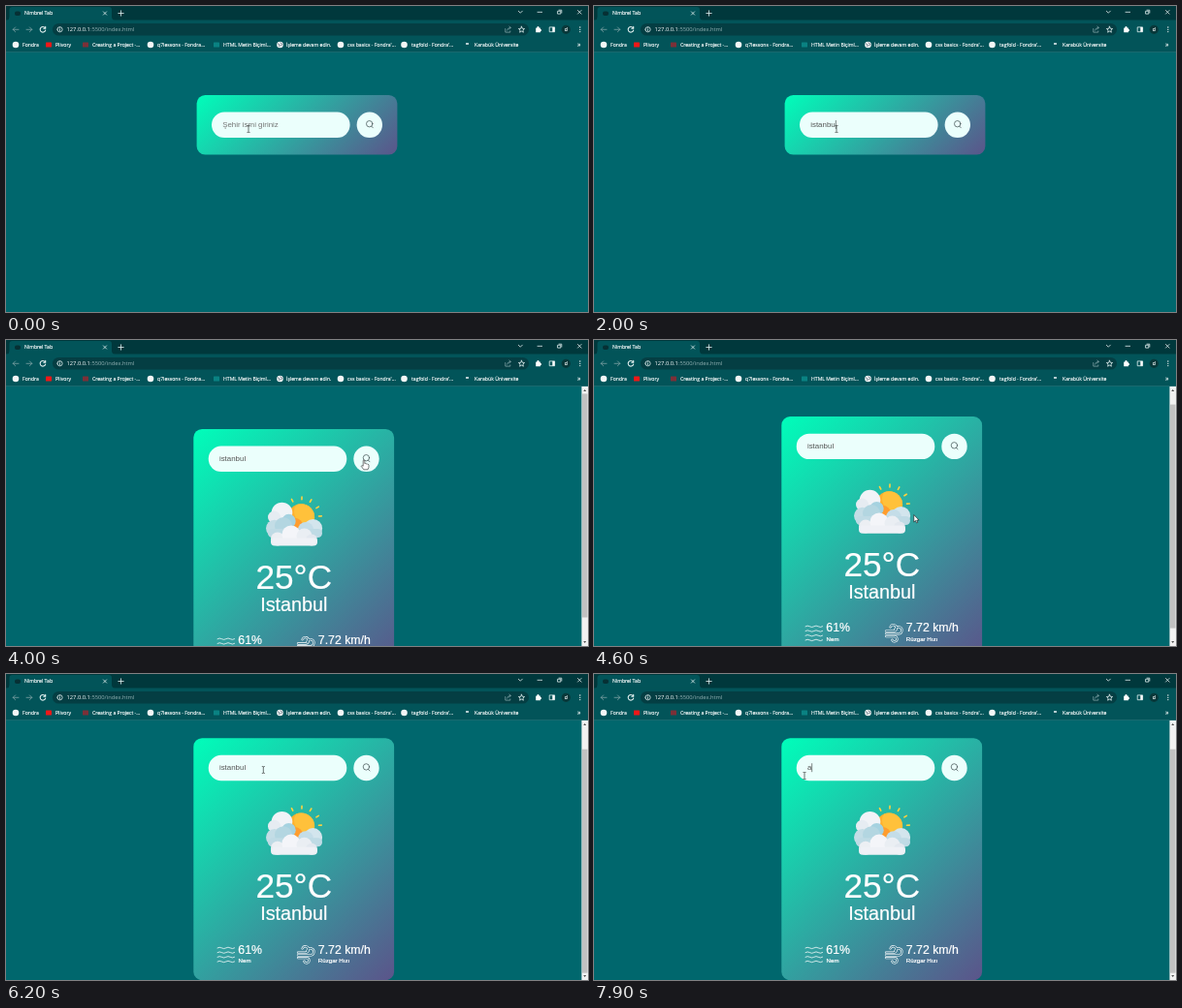
An HTML page that plays this animation: 600 by 316 pixels, repeating every 8000 ms.

```html
<!DOCTYPE html>
<html lang="tr">
<head>
<meta charset="utf-8">
<title>Nimbrel Tab</title>
<style>
  html, body { margin: 0; width: 100%; height: 100%; overflow: hidden; background: #00676d; }
  svg { display: block; width: 100vw; height: 100vh; }
  .ui { font-family: "Open Sans", "Noto Sans", sans-serif; font-size: 5.15px; fill: #fff; }
  .ui text { stroke: #fff; stroke-width: .14; }
  .ui .url { font-size: 5.78px; stroke: none; }
  .page { font-family: "Liberation Sans", Arial, sans-serif; fill: #fff; }
  #result text { stroke: #fff; stroke-width: .22; }
  .line { fill: none; stroke: #e4f0f0; stroke-width: .8; stroke-linecap: round; stroke-linejoin: round; }
</style>
</head>
<body>
<svg viewBox="0 0 600 316" xmlns="http://www.w3.org/2000/svg">
  <defs>
    <linearGradient id="cardFill" gradientUnits="userSpaceOnUse">
      <stop offset="0" stop-color="#00feba"/>
      <stop offset="1" stop-color="#5b548a"/>
    </linearGradient>
    <clipPath id="sunClip"><circle cx="304.3" cy="183" r="13.8"/></clipPath>
  </defs>

  <rect width="600" height="316" fill="#00676d"/>

  <g id="content" class="page">
    <g id="panel">
      <rect id="card" x="196.6" y="92" width="206.8" rx="8.8" fill="url(#cardFill)"/>
      <rect x="212" y="109.6" width="142.6" height="26.4" rx="13.2" fill="#ebfffc"/>
      <rect id="selection" y="117.8" height="9.4" fill="#3390ff"/>
      <text id="query" x="223.2" y="125.1" font-size="7.92"></text>
      <rect id="caret" y="118" width=".6" height="9" fill="#333"/>
      <circle cx="374.8" cy="122.8" r="13.2" fill="#ebfffc"/>
      <g class="line" style="stroke:#3c4a4c;stroke-width:.7">
        <circle cx="374.7" cy="121.7" r="3.2"/>
        <path d="M376.8 124.2l1.5 1.6"/>
      </g>
    </g>
    <g id="result">
      <g id="icon"></g>
      <text x="296.8" y="257.3" font-size="35.2" text-anchor="middle">25°C</text>
      <text x="296.8" y="279.5" font-size="19.8" text-anchor="middle">Istanbul</text>
      <g id="waves" class="line" style="stroke:#fff;stroke-width:.75"></g>
      <text x="239.3" y="314.4" font-size="12.3">61%</text>
      <text x="239.6" y="323.6" font-size="6.16">Nem</text>
      <g id="wind" fill="none" stroke-linecap="round"></g>
      <text x="321.8" y="314.4" font-size="12.3">7.72 km/h</text>
      <text x="321.8" y="323.6" font-size="6.16">Rüzgar Hızı</text>
    </g>
  </g>

  <g id="scrollbar">
    <rect x="593.4" y="48" width="6.6" height="268" fill="#f1f1f1"/>
    <path d="M595.2 53l1.5-2 1.5 2zM595.2 311l1.5 2 1.5-2z" fill="#505050"/>
    <rect id="thumb" x="594" width="5.5" height="231" fill="#c1c1c1"/>
  </g>

  <g id="chrome" class="ui"></g>

  <path id="ibeam" d="M-1.5-3.5H-.5L0-3.1.5-3.5H1.5M0-3.1V3.1M-1.5 3.5H-.5L0 3.1.5 3.5H1.5"
        fill="none" stroke="#222" stroke-width=".65"/>
  <path id="arrow" d="M0 0V7.5L1.7 5.9 2.8 8.4 4 7.9 2.9 5.5H5.3Z" fill="#fff" stroke="#111" stroke-width=".6"/>
  <path id="hand" d="M-.8 .4Q0-.5 .8 .4V3.6Q1.8 3 2.4 3.9 3.4 3.4 3.9 4.4 4.9 4.2 5 5.2V7.4L4 9.8H-.2L-2.8 6.3Q-2.6 5 -.8 6.2Z"
        fill="#fff" stroke="#222" stroke-width=".6" stroke-linejoin="round"/>
</svg>

<script>
const $ = id => document.getElementById(id);
const set = (id, attrs) => Object.entries(attrs).forEach(([k, v]) => $(id).setAttribute(k, v));
const show = (id, on) => { $(id).style.display = on ? "" : "none"; };
const circle = (x, y, r, fill) => `<circle cx="${x}" cy="${y}" r="${r}" fill="${fill}"/>`;
const box = (x, y, w, h, fill, rx = 0) =>
  `<rect x="${x}" y="${y}" width="${w}" height="${h}" rx="${rx}" fill="${fill}"/>`;
const label = (x, y, text, extra = "") => `<text x="${x}" y="${y}" ${extra}>${text}</text>`;
const line = (d, extra = "") => `<path class="line" d="${d}" ${extra}/>`;

function drawChrome() {
  const bar = "#025459", dim = 'style="stroke:#7fa3a6"';
  const dot = (x, fill) => circle(x, 40, 3.3, fill);
  const tile = (x, fill) => box(x - 3, 37.5, 6, 5, fill, .6);
  const marks = [
    [17, "Fondra", dot(10, "#f4f6f6")],
    [51, "Plivory", tile(44, "#f01818")],
    [89, "Creating a Project -...", tile(82, "#7b3038")],
    [156, "q7lessons - Fondra...", dot(149, "#f4f6f6")],
    [224, "HTML Metin Biçiml...", tile(217, "#0a8282")],
    [289, "İşleme devam edin.", dot(282.5, "#f4f6f6") +
      line("M280.5 39l1.6 1.2-.4 1.4M283 37.8l1.6 1.6-1 1.6", 'style="stroke:#456"')],
    [352, "css basics - Fondra'...", dot(345, "#f4f6f6")],
    [418, "tagfold - Fondra'...", dot(410.5, "#f4f6f6")],
    [483, "Karabük Üniversite", box(474, 38, 3, 2, "#b5cdd0")]
  ];
  $("chrome").innerHTML =
    box(0, 0, 600, 15, "#00383c") +
    `<path d="M1 15Q3.5 14 3.5 11V4Q3.5 1 6.5 1H106Q109 1 109 4V11Q109 14 112 15Z" fill="${bar}"/>` +
    box(0, 14.5, 600, 33.5, bar) + box(0, 47.4, 600, .6, "#2b787d") +
    box(9, 5.5, 6, 4.5, "#063034", 2) + label(19, 9.3, "Nimbrel Tab") +
    line("M100.4 5.9l3.2 3.2m0-3.2l-3.2 3.2M118.5 4.8v5.4M115.8 7.5h5.4") +
    line("M528.3 5.2l2 2 2-2M548 6.3h4.6M569 5.3h2.8v2.8h-2.8zM570 4.2h2.8v2.8M589.5 4.5l3.6 3.6m0-3.6l-3.6 3.6") +
    line("M13 24.3H7.2m2.4-2.4l-2.4 2.4 2.4 2.4M21 24.3h5.8m-2.4-2.4l2.4 2.4-2.4 2.4", dim) +
    line("M40.3 22.7A2.8 2.8 0 1 0 40.7 25M40.7 21.4v1.9h-2", 'style="stroke-width:1.1"') +
    box(48, 18, 491, 12.6, "#043e43", 6.3) +
    line("M52.9 24.2a2.6 2.6 0 1 0 5.2 0a2.6 2.6 0 1 0-5.2 0M55.5 24v1.5M55.5 22.7v.1") +
    label(62.5, 26.3, '127.0.0.1<tspan fill="#93b1b3">:5500/index.html</tspan>', 'class="url"') +
    line("M514.8 23.5v3.6h5v-1.2M516.6 25q.4-2.6 3.6-2.6m-1.3-1.3l1.5 1.3-1.5 1.3", dim) +
    line("M531.5 21.2l.9 2.1 2.2.2-1.7 1.5.5 2.2-1.9-1.1-1.9 1.1.5-2.2-1.7-1.5 2.2-.2z") +
    box(546.2, 22.6, 4.8, 4.6, "#fff", .5) + circle(548.5, 22.2, 1.1, "#fff") + circle(551, 25, 1.1, "#fff") +
    line("M560.6 21.9h5v4.8h-5z") + box(563.3, 21.9, 2.3, 4.8, "#fff") +
    circle(577.3, 24.3, 4.6, "#08383a") + label(577.3, 26, "d", 'text-anchor="middle"') +
    [22, 24.3, 26.6].map(y => circle(591.8, y, .65, "#fff")).join("") +
    marks.map(([x, text, icon]) => icon + label(x, 41.8, text)).join("") +
    label(589, 42, "»", 'style="font-size:7px"');
}

function drawWeather() {
  const rays = [-118, -88, -60, -31, -3].map(a =>
    `<path d="M18.2 0h2.8" transform="translate(304.3 183) rotate(${a})"
      stroke="#ffd23e" stroke-width="1.6" stroke-linecap="round"/>`).join("");
  $("icon").innerHTML = rays +
    circle(304.3, 183, 13.8, "#ffb02e") +
    `<g clip-path="url(#sunClip)">${circle(309, 177, 12, "#ffc13b") + circle(298, 192, 8, "#ff9d2e")}</g>` +
    circle(284.5, 178.5, 10.8, "#f0f3f7") + circle(276.5, 183, 6.5, "#e6ecf2") +
    circle(291.5, 187, 7.2, "#a5d2e0") +
    circle(316.5, 194.5, 9.6, "#d3e5ed") + circle(309, 196, 8, "#c4dde8") +
    circle(276.8, 194.5, 8.8, "#c3dde6") + circle(286, 192, 9, "#b3d6e1") +
    box(270, 195, 56, 9, "#bfdbe5", 4.5) +
    circle(280, 205.5, 7, "#eceff3") + circle(294, 201, 9.6, "#f4f5f9") +
    circle(307.5, 202.5, 8, "#eaeef3") + circle(315, 206.5, 6, "#e3e8ef") +
    box(273, 204.5, 48, 8.1, "#eff1f6", 4);

  $("waves").innerHTML = [0, 1, 2, 3].map(i =>
    `<path d="M218 ${308.7 + i * 4.7}q2.2-1.4 4.4 0t4.4 0 4.4 0 4.4 0"/>`).join("");

  const gust = "M301 313.5H308.5A3.2 3.2 0 1 0 305.6 309.2M301 316.2H313.6A3.5 3.5 0 1 0 310.5 311.8" +
    "M301 319H309.8A2.6 2.6 0 1 1 307.4 322.6";
  $("wind").innerHTML = `<path d="${gust}" stroke="#fff" stroke-width="2.3"/>
    <path d="${gust}" stroke="#438096" stroke-width="1.1"/>`;
}

const LOOP = 8000, TICK = 100, RESULT_AT = 4000, UNFOCUS_AT = 3900, RETYPE_AT = 7800;
const WORD = "istanbul", KEY_TIMES = [1000, 1200, 1300, 1500, 1600, 1800, 1900, 2100];
const MOUSE = [
  [0, 250, 127], [2600, 250, 127], [3500, 369, 124], [4300, 369, 124], [4700, 322.5, 191],
  [5500, 322.5, 191], [6100, 265.3, 99], [6300, 265.3, 99], [6900, 217, 105], [LOOP, 217, 105]
];
const ease = u => u * u * (3 - 2 * u);
const ramp = (t, a, b) => ease(Math.min(1, Math.max(0, (t - a) / (b - a))));

function mouseAt(t) {
  const i = MOUSE.findIndex(k => k[0] > t);
  const [t0, x0, y0] = MOUSE[i - 1], [t1, x1, y1] = MOUSE[i];
  const u = ramp(t, t0, t1);
  return [x0 + (x1 - x0) * u, y0 + (y1 - y0) * u];
}

function drawInput(t, mouseX, dx) {
  const retyped = t >= RETYPE_AT;
  const typed = KEY_TIMES.filter(k => k <= t);
  const text = retyped ? "a" : WORD.slice(0, typed.length);
  const query = $("query");
  query.textContent = text || "Şehir ismi giriniz";
  query.setAttribute("fill", text ? "#555" : "#757575");

  const left = 223.2, end = left + (text ? query.getComputedTextLength() : 0);
  const lastKey = retyped ? RETYPE_AT : typed.length ? typed[typed.length - 1] : -600;
  const focused = t < UNFOCUS_AT || retyped;
  show("caret", focused && (t - lastKey) % 1060 < 530);
  set("caret", { x: end + .2 });

  const from = Math.max(left, mouseX - dx);
  const selected = t >= 6400 && !retyped && from < end;
  show("selection", selected);
  if (selected) {
    set("selection", { x: from, width: end - from });
    if (from === left) query.setAttribute("fill", "#fff");
  }
}

function render(now) {
  const t = Math.floor((now % LOOP) / TICK + .01) * TICK % LOOP;
  const done = t >= RESULT_AT;
  const dx = done ? -3.3 : 0, h = done ? 250 : 61.6;
  const scroll = 25.8 * ramp(t, 4450, 4750);

  set("content", { transform: `translate(0 ${-scroll})` });
  set("panel", { transform: `translate(${dx} 0)` });
  set("card", { height: h });
  const reach = (206.8 + h) / 4, cy = 92 + h / 2;
  set("cardFill", { x1: 300 - reach, y1: cy - reach, x2: 300 + reach, y2: cy + reach });
  show("result", done);
  show("scrollbar", done);
  set("thumb", { y: 55.5 + scroll * .86 });

  const [x, y] = mouseAt(t);
  drawInput(t, x, dx);
  const px = x - dx, py = y + scroll;
  const overInput = px > 212 && px < 354.6 && py > 109.6 && py < 136;
  const overButton = Math.hypot(px - 374.8, py - 122.8) < 13.2;
  const cursor = overInput ? "ibeam" : overButton ? "hand" : "arrow";
  for (const id of ["ibeam", "hand", "arrow"]) show(id, id === cursor);
  set(cursor, { transform: `translate(${x} ${y})` });
}

drawChrome();
drawWeather();
let start;
function loop(now) {
  start ??= now;
  render(now - start);
  requestAnimationFrame(loop);
}
render(0);
requestAnimationFrame(loop);
</script>
</body>
</html>
```
